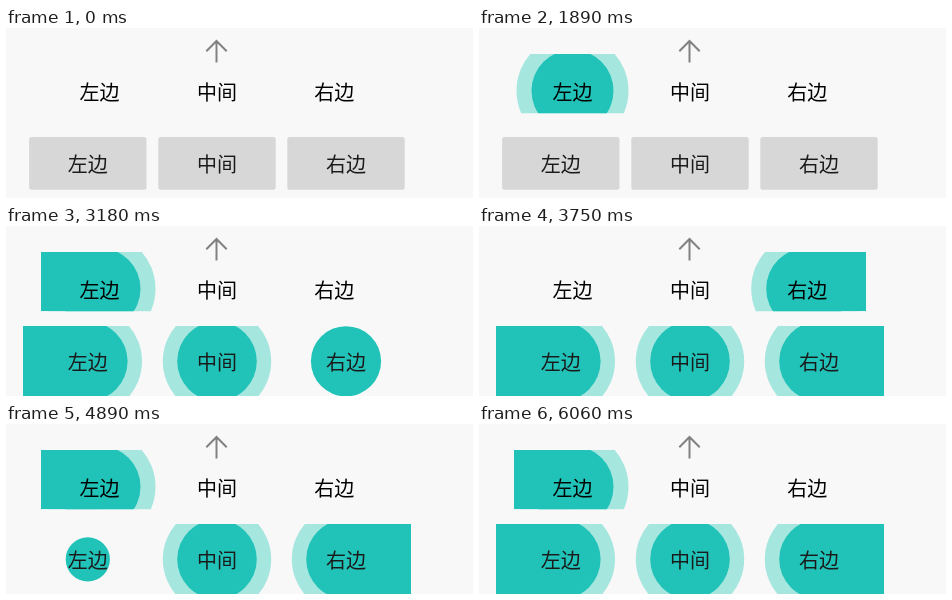
An HTML page with a canvas for the animation above (6750 ms loop, 467 by 170 pixels).

```html
<!DOCTYPE html>
<html lang="zh-CN">
<head>
<meta charset="utf-8">
<title>Reveal tabs</title>
<style>
html, body { margin: 0; width: 100%; height: 100%; overflow: hidden; background: #f8f8f8; }
canvas { display: block; }
</style>
</head>
<body>
<canvas id="stage" width="467" height="170"></canvas>
<script>
const ctx = document.getElementById('stage').getContext('2d');
const LOOP = 6750, STEP = 30;
const SPEED = 13 / 30;   // ripple growth, px per ms
const GROW = 141;        // ms from ripple birth to full size
const FILL = 90;         // ms for the side fill
const TEAL = '#21c3b9', PALE = '#a5e6df', GREY = '#d7d7d7';

// side: -1 fills to the left, 1 to the right, 0 not at all
const tabs = [
  { label: '左边', x: 93.5, y: 62.8, top: 26, edge: 35, side: -1 },
  { label: '中间', x: 211, y: 48.3, top: 11.5, edge: 211, side: 0 },
  { label: '右边', x: 328.2, y: 62.8, top: 26, edge: 387, side: 1 },
].map(t => ({ ...t, bottom: 85.2, inner: 41, outer: 56, textY: 71.5, ink: '#000' }));

const buttons = [
  { label: '左边', x: 81.8, edge: 17, side: -1 },
  { label: '中间', x: 211, edge: 211, side: 0 },
  { label: '右边', x: 340, edge: 405, side: 1 },
].map(b => ({ ...b, y: 135.3, top: 100, bottom: 171, inner: 39.8, outer: 54.2, textY: 144, ink: '#1a1a1a' }));

// Each press: [start, end of its motion, item index]
const tabPresses = [[540, 750, 2], [1080, 1200, 1], [1770, 1980, 0], [3540, 3750, 2], [4050, 4200, 1], [4530, 4710, 0]];
const buttonPresses = [[2220, 2460, 0], [2640, 2820, 1], [3090, 3330, 2], [4890, 5070, 0], [5310, 5460, 1], [5850, 6060, 2]];

const latest = (presses, t, index) =>
  presses.filter(p => p[0] <= t && (index === undefined || p[2] === index)).pop();

function disc(x, y, r, color) {
  ctx.fillStyle = color;
  ctx.beginPath();
  ctx.arc(x, y, r, 0, Math.PI * 2);
  ctx.fill();
}

function ripple(item, end, t) {
  const { x, y, top, bottom, inner, outer, edge, side } = item;
  const full = side ? end - FILL : end;
  const r = Math.max(0, Math.min(outer, (t - full + GROW) * SPEED));
  ctx.save();
  ctx.beginPath();
  ctx.rect(side < 0 ? edge : 0, top, side > 0 ? edge : 467, bottom - top);
  ctx.clip();
  if (r > inner) disc(x, y, r, PALE);
  disc(x, y, Math.min(r, inner), TEAL);
  const part = Math.max(0, Math.min(1, (t - full) / FILL));
  if (side && part) {
    const w = Math.abs(edge - x) * part;
    ctx.fillStyle = TEAL;
    ctx.fillRect(side < 0 ? x - w : x, top, w, bottom - top);
  }
  ctx.restore();
}

function arrow(color) {
  ctx.strokeStyle = color;
  ctx.lineWidth = 2;
  ctx.beginPath();
  ctx.moveTo(210.5, 34.5);
  ctx.lineTo(210.5, 13);
  ctx.moveTo(200.3, 23.2);
  ctx.lineTo(210.5, 13);
  ctx.lineTo(220.7, 23.2);
  ctx.stroke();
}

function text(item) {
  ctx.fillStyle = item.ink;
  ctx.fillText(item.label, item.x, item.textY);
}

function draw(t) {
  ctx.fillStyle = '#f8f8f8';
  ctx.fillRect(0, 0, 467, 170);
  ctx.font = '20px "Noto Sans CJK SC", "Noto Sans CJK", sans-serif';
  ctx.textAlign = 'center';

  const active = latest(tabPresses, t);
  if (active) ripple(tabs[active[2]], active[1], t);
  arrow(active && active[2] === 1 ? '#fff' : '#818181');
  tabs.forEach(text);

  buttons.forEach((b, i) => {
    const press = latest(buttonPresses, t, i);
    if (press) {
      ripple(b, press[1], t);
    } else {
      ctx.fillStyle = GREY;
      ctx.beginPath();
      ctx.roundRect(b.x - 58.7, 109, 117.4, 52.7, 2.5);
      ctx.fill();
    }
    text(b);
  });
}

const start = performance.now();
function tick() {
  const t = (performance.now() - start) % LOOP;
  draw(Math.floor((t + 0.01) / STEP) * STEP);
  requestAnimationFrame(tick);
}
tick();
</script>
</body>
</html>
```
